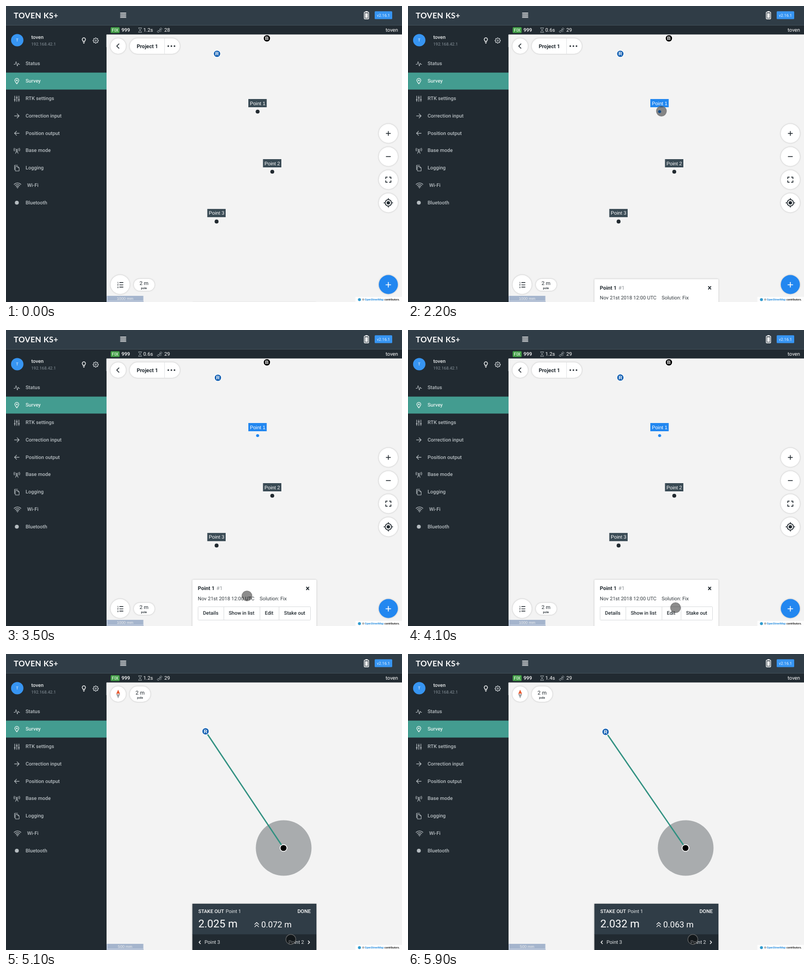
These frames come from a looping animation (768x576 px, 6 s). An HTML page:

```html
<!DOCTYPE html>
<html lang="en">
<head>
<meta charset="utf-8">
<title>Survey stake out</title>
<style>
  html, body { margin: 0; width: 100%; height: 100%; overflow: hidden; background: #f3f3f3; }
  svg { display: block; width: 768px; height: 576px; font-family: Roboto, "Liberation Sans", sans-serif; }
  text { white-space: pre; text-rendering: geometricPrecision; }
  .m { font-weight: 500; }
  .b { font-weight: 700; }
  .map { font-family: "Liberation Sans", Arial, sans-serif; }
  .mid { text-anchor: middle; }
  .end { text-anchor: end; }
  .up { fill: #fff; filter: drop-shadow(0 .8px 1.5px rgba(0, 0, 0, .24)); }
  .line { fill: none; stroke-linecap: round; stroke-linejoin: round; }
</style>
</head>
<body>
<svg id="stage" viewBox="0 0 768 576"></svg>
<script>
const LOOP = 6000, STEP = 100;
const SELECT = 2000, STAKE = 5000;
const DARK = "#212a31", HEAD = "#303d47", BLUE = "#2287f0", INK = "#222a30";

const text = (x, y, s, fill, cls = "", size = 9.7, id = "") =>
  `<text x="${x}" y="${y}" fill="${fill}" class="${cls}" id="${id}" style="font-size:${size}px">${s}</text>`;
const rect = (x, y, w, h, fill, more = "") =>
  `<rect x="${x}" y="${y}" width="${w}" height="${h}" fill="${fill}" ${more}/>`;
const dot = (x, y, r, fill, more = "") =>
  `<circle cx="${x}" cy="${y}" r="${r}" fill="${fill}" ${more}/>`;
const line = (d, stroke, w = 1, more = "") =>
  `<path class="line" d="${d}" stroke="${stroke}" stroke-width="${w}" ${more}/>`;
const at = (x, y, body) => `<g transform="translate(${x} ${y})">${body}</g>`;
const disc = (x, y, r) => `<circle class="up" cx="${x}" cy="${y}" r="${r}"/>`;
const pill = (x, y, w, h) => `<rect class="up" x="${x}" y="${y}" width="${w}" height="${h}" rx="${h / 2}"/>`;

// Menu icons, each drawn around its own centre
const icons = {
  pulse: c => line("M-5.5 1H-3L-1.5-4.5 1 4.5 2.7-1.5 3.7 1H5.5", c),
  pin: c => line("M0 5C-2 2.3-3.8 0-3.8-1.8a3.8 3.8 0 0 1 7.6 0C3.8 0 2 2.3 0 5Z", c, 1.3) + dot(0, -1.8, 1.5, c),
  sliders: c => line("M-4-5.3V5.3M0-5.3V5.3M4-5.3V5.3", c, 1.2) + line("M-4.6 2H-3.4M-.6-2H.6M3.4 2H4.6", c, 1.8),
  right: c => line("M-4.5 0H4.5M.5-4 4.5 0 .5 4", c, 1.2),
  left: c => line("M4.5 0H-4.5M-.5-4-4.5 0-.5 4", c, 1.2),
  mast: c => line("M0-1.5-2.5 5.5M0-1.5 2.5 5.5M-1.5 2.5H1.5M-3-4a3 3 0 0 0 0 4M3-4a3 3 0 0 1 0 4M-5-5a5 5 0 0 0 0 6M5-5a5 5 0 0 1 0 6", c) + dot(0, -2, 1.3, c),
  pages: c => line("M-2.5-3H2L4.5-.8V5.5H-2.5ZM-4.5 3V-5.5H1.5M2-3V-.8H4.5", c),
  waves: c => line("M-6.5-2a9.5 9.5 0 0 1 13 0M-4.4.4a6.3 6.3 0 0 1 8.8 0M-2.3 2.7a3.2 3.2 0 0 1 4.6 0", c, 1.3) + dot(0, 4.6, 1.1, c),
  plain: c => dot(0, 0, 3.8, c),
};

const menu = [
  ["pulse", "Status", 112], ["pin", "Survey", 146], ["sliders", "RTK settings", 180],
  ["right", "Correction input", 213.3], ["left", "Position output", 247.2], ["mast", "Base mode", 281],
  ["pages", "Logging", 315], ["waves", "Wi-Fi", 348.5], ["plain", "Bluetooth", 382.3],
];

function sidebar() {
  const rows = menu.map(([icon, name, y]) => {
    const on = name === "Survey", color = on ? "#e6f2ef" : "#b6bdc1";
    return (on ? rect(0, 129.6, 195, 33, "#439c90") : "") +
      at(icon === "waves" ? 22.3 : 21, y + .5, icons[icon](color)) +
      text(icon === "waves" ? 41 : 38, y + 3.4, name, color, "m");
  }).join("");
  const teeth = [...Array(8)].map((_, i) => `<path d="M0-4.3V-5.8" transform="rotate(${i * 45})"/>`).join("");
  return rect(0, 38, 195, 538, DARK) + rect(194.3, 56, .7, 24, "#7d868b") +
    dot(21.8, 66.5, 12, "#3795f2") + text(21.8, 69.3, "T", "#fff", "mid", 7.6) +
    text(49, 63.5, "toven", "#e8ebec", "m") +
    text(49, 77.4, "192.168.42.1", "#87929a", "", 8.2) +
    at(151, 67, line("M-1.5 2.3V.9A3.2 3.2 0 1 1 1.5.9V2.3Z", "#fff", 1.3) + line("M-1.2 4.3H1.2M-.5 5.6H.5", "#fff")) +
    at(174, 67.3, dot(0, 0, 4.5, "none", `stroke="#d5dadd" stroke-width="1.1"`) + dot(0, 0, 1.5, "none", `stroke="#d5dadd"`) +
      `<g stroke="#d5dadd" stroke-width="1.7">${teeth}</g>`) +
    rows;
}

function header() {
  return rect(0, 0, 768, 37.2, HEAD) + rect(195, 38, 573, 17.4, DARK) + rect(0, 37, 768, 1, "#414e57") +
    `<text x="15" y="23.8" fill="#fff" style="font:700 15.2px Lato,sans-serif;letter-spacing:.4px">TOVEN KS+</text>` +
    line("M222 13.7H232.6M222 16.6H232.6M222 19.5H232.6M222 22.4H232.6", "#fff", 1.4) +
    rect(694.8, 11.8, 8.6, 13.2, "none", `rx="1" stroke="#fff" stroke-width="1.3"`) +
    rect(697.2, 10, 4, 1.8, "#fff") + rect(696.6, 14, 5, 9.2, "#fff") +
    rect(715, 10.3, 34, 15.2, "#3795f2", `rx="1.5"`) + text(732, 20.8, "v2.16.1", "#e6f1fc", "mid", 7.8) +
    rect(203, 41.2, 17.4, 11.2, "#43a047", `rx="1.5"`) + text(211.7, 50, "FIX", "#fff", "mid", 8.8) +
    text(224, 50.2, "999", "#fff", "m") +
    line("M257 42.5H263M257 51.2H263M257.8 42.5V44.3L262.2 49.4V51.2M262.2 42.5V44.3L257.8 49.4V51.2", "#aeb6ba", .8) +
    text(266.3, 50.2, "", "#fff", "", 9.8, "age") +
    at(298, 47, `<g transform="rotate(-45)">` + line("M-5-1.5H-1.7V1.5H-5ZM1.7-1.5H5V1.5H1.7ZM-1.7 0H1.7M-1 3.2a1.6 1.6 0 0 0 2 0", "#aeb6ba", .9) + "</g>") +
    text(307, 50.2, "", "#fff", "", 9.8, "sats") +
    text(760.3, 50.2, "toven", "#fff", "end", 9.9);
}

const marker = (letter, fill) =>
  dot(0, 0, 6.8, fill, `stroke="#fff" stroke-width="1.2"`) + text(0, 3.4, letter, "#fff", "map b mid", 9.6);

const point = (n, x, y) => at(x, y,
  rect(-18, -24.5, 35.6, 16, "#3a4b55", `id="tag${n}"`) +
  text(0, -13, "Point " + n, "#fff", "map mid", 9.7) +
  dot(0, 0, 3.8, INK, `id="spot${n}"`));

function card() {
  const labels = [[382, "Details"], [432, "Show in list"], [502, "Edit"], [539.3, "Stake out"]];
  return `<g id="card"><rect class="up" x="361.5" y="486" width="240.5" height="95" rx="1.5"/>` +
    text(372, 506.2, "Point 1", INK, "b", 10.2) + text(408, 506.2, "#1", "#8d9296", "", 10.1) +
    line("M582.7 500.3 587.3 505.3M587.3 500.3 582.7 505.3", INK, 1.7) +
    text(372, 525.8, "Nov 21st 2018 12:00 UTC", "#333a3f") + text(492, 525.8, "Solution: Fix", "#333a3f") +
    rect(372.5, 538.5, 218, 26, "#fff", `stroke="#dadcde" rx="1"`) +
    line("M422.5 538.5V564.5M492.5 538.5V564.5M529.5 538.5V564.5", "#dadcde") +
    labels.map(([x, s]) => text(x, 554.4, s, INK, "m")).join("") + "</g>";
}

function surveyView() {
  return `<g id="survey">` +
    at(506, 63, marker("B", "#000")) +
    point(1, 488, 205.5) + point(2, 516.4, 322.5) + point(3, 408.4, 419.4) +
    disc(217.5, 78, 15) + line("M219 73.8 214.8 78 219 82.2", INK, 1.6) +
    pill(240, 63, 97, 30) + line("M307.5 63.5V92.5", "#e2e4e5") +
    text(253.4, 81.6, "Project 1", INK, "b", 10.3) +
    [314.8, 320.8, 326.8].map(x => dot(x, 78, 1.6, INK)).join("") +
    [248, 293, 338, 383].map(y => disc(741.5, y, 18.5)).join("") +
    line("M737.4 248H745.6M741.5 243.9V252.1M737.4 293H745.6", INK, 1.5) +
    line("M736.5 336V333H739.5M743.5 333H746.5V336M746.5 340V343H743.5M739.5 343H736.5V340", INK, 1.6) +
    dot(741.5, 383, 6.2, "none", `stroke="${INK}" stroke-width="1.6"`) + dot(741.5, 383, 3.3, INK) +
    line("M741.5 374.5V376.5M741.5 389.5V391.5M733 383H735M748 383H750", INK, 1.6) +
    `<circle class="up" cx="741.5" cy="542" r="18.5" style="fill:${BLUE}"/>` +
    line("M736.9 542.5H746.1M741.5 537.9V547.1", "#fff", 1.6) +
    disc(221.3, 542, 18.5) + line("M220.5 538.2H227M220.5 542.6H227M220.5 547H227", INK, 1.4) +
    [1, 2, 3].map(n => text(215.8, 535.6 + n * 4.4, n, INK, "b", 4.4)).join("") +
    pill(248, 531, 40, 23) + text(267.5, 543, "2 m", INK, "mid", 10.2) + text(267.5, 551, "pole", INK, "m mid", 5.9) +
    card() + "</g>";
}

function stakeView() {
  return `<g id="stake">` +
    dot(538.5, 377.5, 54, "#a9acae") + `<path id="track" stroke="#2f9080" stroke-width="2.5"/>` +
    dot(538.2, 377.5, 6.6, "#000", `stroke="#fff" stroke-width="1.5"`) +
    disc(217.5, 78, 15) +
    `<path d="M217.5 69.5 221.2 77.5H213.8Z" fill="#e8592f"/><path d="M217.5 86.5 221.2 78H213.8Z" fill="#9ba2a6"/>` +
    dot(217.5, 77.8, 1.1, "#fff") +
    pill(240, 63, 40, 30) + text(260, 79, "2 m", INK, "mid", 10.4) + text(260, 87, "pole", INK, "m mid", 5.9) +
    `<g style="filter:drop-shadow(0 0 1.5px rgba(0,0,0,.3))">` + rect(361.5, 486, 240.5, 60, HEAD) + rect(361.5, 545.5, 240.5, 31, DARK) + "</g>" +
    text(373, 504, "STAKE OUT", "#fff", "m", 9.55) + text(426, 504, "Point 1", "#e3e6e8", "", 9.6) +
    text(591, 504, "DONE", "#fff", "m end", 9.9) +
    text(373, 532, "", "#fff", "", 20.9, "range") + text(495, 532, "", "#fff", "", 16.2, "ahead") +
    line("M482.5 526 486.2 522.3 489.9 526M482.5 530.8 486.2 527.1 489.9 530.8", "#fff", 1.2) +
    line("M377 558.3 374.4 561 377 563.7M586.2 558.3 588.8 561 586.2 563.7", "#fff", 1.3) +
    text(385, 564.4, "Point 3", "#e3e6e8") + text(547.7, 564.4, "Point 2", "#e3e6e8") + "</g>";
}

function footer() {
  return rect(195, 564, 72, 12, "rgba(0,50,125,.32)", `rx="1.5"`) +
    `<path d="M196.3 565V574.2H266.4V565" fill="none" stroke="#e4e8ef" stroke-width=".8"/>` +
    text(231, 572.2, "", "#eee", "map mid", 7.7, "scale") +
    rect(677.5, 566, 90.5, 10, "#fff", `opacity=".85"`) + dot(685.5, 571.3, 2.9, "#2f9bcf") +
    text(690.8, 573.3, "©", "#222", "b", 5.1) + text(695.8, 573.3, "OpenStreetMap", "#2a8fe0", "b", 5.2) +
    text(734, 573.3, "contributors.", "#222", "b", 5.1);
}

document.getElementById("stage").innerHTML =
  rect(0, 0, 768, 576, "#f3f3f3") + surveyView() + stakeView() + `<g id="rover">${marker("R", "#1762b3")}</g>` +
  footer() + sidebar() + header() +
  `<circle id="cursor" r="9.7" fill="rgba(0,0,0,.45)" stroke="rgba(118,118,118,.8)" stroke-width="1.3"/>`;

const $ = id => document.getElementById(id);
const smooth = u => u * u * (3 - 2 * u);
const linear = u => u;

// Rows are [time, ...values]
function mix(rows, t, ease = linear) {
  const i = rows.findIndex(r => r[0] > t);
  if (i === 0) return rows[0].slice(1);
  if (i < 0) return rows[rows.length - 1].slice(1);
  const [a, b] = [rows[i - 1], rows[i]];
  const u = ease((t - a[0]) / (b[0] - a[0]));
  return a.slice(1).map((v, k) => v + (b[k + 1] - v) * u);
}
const hold = (rows, t) => rows.filter(r => r[0] <= t).pop().slice(1);

const cursorPath = [[600, 500.3, 257], [1400, 491.5, 204.6], [2600, 491.5, 204.6], [3400, 467.3, 517.5], [3700, 467.3, 517.5], [4400, 552.4, 555.3]];
const cursorFade = [[500, 0], [700, 1]];
const cardDrop = [[SELECT, 91], [2400, 0]];
const roverPath = [[0, 409.3, 93], [900, 410.2, 93], [2200, 411.7, 93], [3500, 411, 93], [4900, 413, 92]];
const stakePath = [[5300, 387, 150.5], [5900, 383.2, 151.5]];
const status = [[0, "1.2s", 28], [1500, "0.6s", 29], [4000, "1.2s", 29], [5500, "1.4s", 29]];
const readout = [[0, "2.025", "0.072"], [5500, "2.028", "0.068"], [5700, "2.032", "0.063"]];

function draw(t) {
  const staking = t >= STAKE, picked = t >= SELECT;
  $("survey").style.display = staking ? "none" : "";
  $("stake").style.display = staking ? "" : "none";
  $("scale").textContent = staking ? "500 mm" : "1000 mm";

  const [x, y] = mix(staking ? stakePath : roverPath, t);
  $("rover").setAttribute("transform", `translate(${x} ${y})`);
  $("track").setAttribute("d", `M${x} ${y}L538.2 377.5`);

  $("tag1").setAttribute("fill", picked ? BLUE : "#3a4b55");
  const spot = $("spot1");
  spot.setAttribute("fill", picked ? BLUE : INK);
  spot.setAttribute("r", picked ? 3.5 : 3.8);
  spot.setAttribute("stroke", picked ? "#fff" : "none");
  $("card").setAttribute("transform", `translate(0 ${mix(cardDrop, t, smooth)[0]})`);

  const [age, sats] = hold(status, t), [range, ahead] = hold(readout, t);
  $("age").textContent = age;
  $("sats").textContent = sats;
  $("range").textContent = range + " m";
  $("ahead").textContent = ahead + " m";

  const [cx, cy] = mix(cursorPath, t, smooth);
  $("cursor").setAttribute("transform", `translate(${cx} ${cy})`);
  $("cursor").setAttribute("opacity", mix(cursorFade, t)[0]);
}

const start = performance.now();
function tick() {
  const t = (performance.now() - start) % LOOP;
  draw(Math.floor(t / STEP) * STEP);
  requestAnimationFrame(tick);
}
tick();
</script>
</body>
</html>
```
